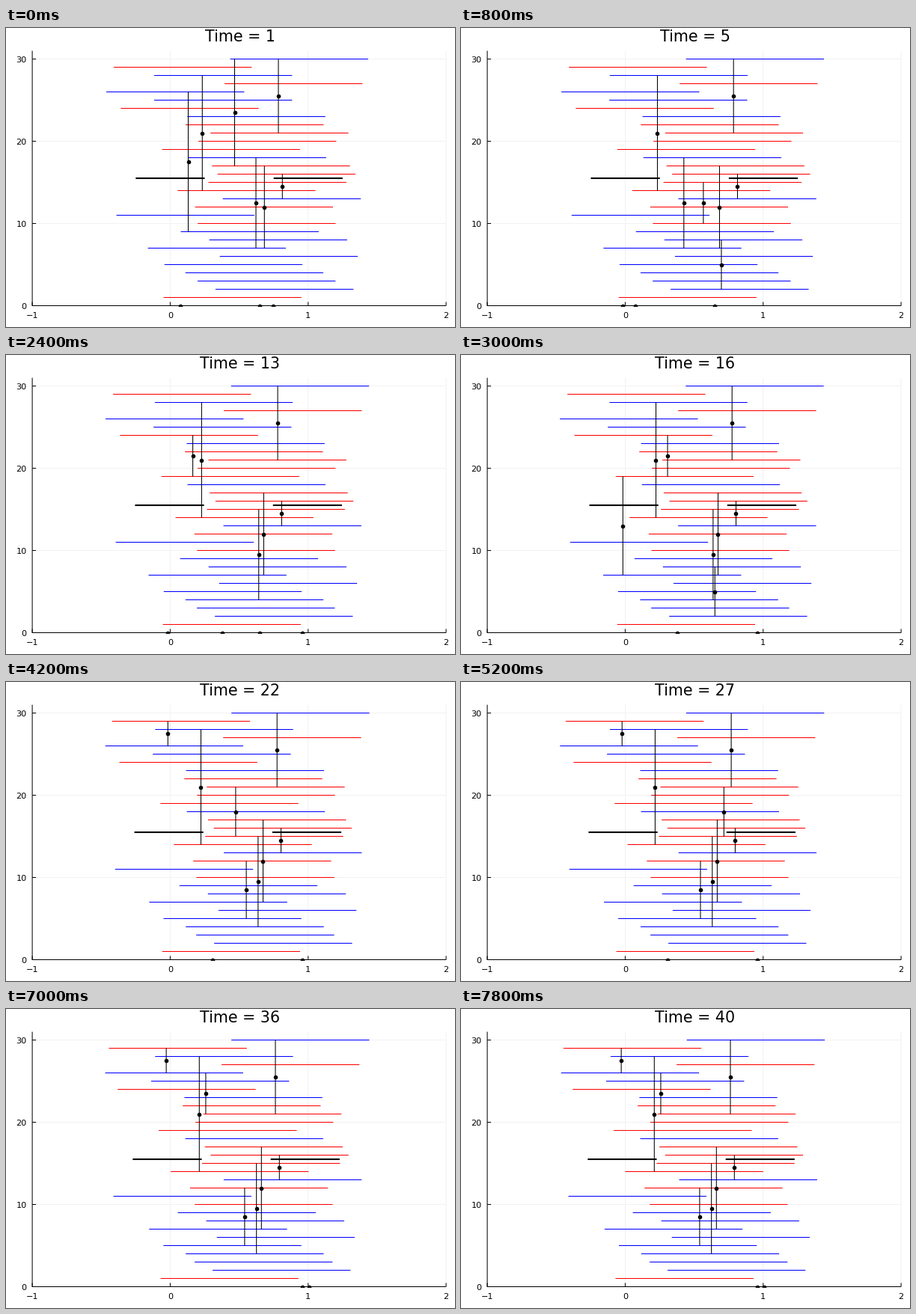
Recreate the animation shown at these times as a matplotlib script. Size 600 px wide and 400 px high, loop 8000 ms.

```python
import numpy as np
import matplotlib.pyplot as plt
from matplotlib.animation import FuncAnimation
from matplotlib.collections import LineCollection
from matplotlib.patches import Rectangle

W, H, DPI = 600, 400, 100
FRAMES, INTERVAL = 40, 200
LEFT, TOP, BASE = 35.1, 30.5, 371.5
UNIT, ROW = 184.33, 11.0      # pixels per x unit and per filament row
RIGHT = LEFT + 3 * UNIT
WALK, SLIDE = 9.1, 0.15       # pixels per step
PX = 72 / DPI                 # one pixel in points

# filaments from the bottom up: direction and left end at the first step
COLORS = [{"R": "red", "B": "blue"}[c]
          for c in "RBBBBBBBBRBRBRRRRBRRRRBRBBRBRB"]
STARTS = [210.5, 280, 256, 239.7, 211.7, 285.7, 189.6, 271.6, 233.6, 256.2,
          147.6, 252.6, 289.7, 229.3, 270.5, 282.6, 275.3, 243.5, 208.6, 257,
          273.2, 240.1, 242.4, 153.3, 198, 134, 292, 198, 144, 299.6]

# motors: first x, then visits (step, lower, upper); (step,) lets go
MOTORS = [
    (262.3, (0, 14, 28)),
    (364.0, (0, 21, 30)),
    (345.3, (0, 7, 17)),
    (369.3, (0, 13, 16)),
    (357.0, (3, 2, 8), (5, 4, 15)),
    (339.3, (15, 2, 8), (17, 5, 12)),
    (305.5, (0, 17, 30), (2, 10, 15), (12,)),
    (243.5, (0, 9, 26), (3,), (15, 7, 19), (18, 26, 29)),
    (334.0, (0, 7, 18), (5,), (19, 15, 21), (31,), (34, 15, 21), (35,)),
    (232.7, (8, 7, 11), (9, 19, 24), (16, 9, 18), (17,), (34, 9, 18),
     (35, 21, 26)),
]


def row_y(n):
    return BASE - ROW * n


def drift(t):
    """Common sideways drift of everything that is bound."""
    return np.interp(t, [0, 9, 14, 21, 31], [0, 0.4, -1.8, -1.8, -4])


def held(visits, t):
    """Filament pair held at step t, or an empty tuple."""
    past = [pair for start, *pair in visits if start <= t]
    return past[-1] if past else ()


def simulate():
    """Motors walk along parallel filaments and slide opposed ones apart."""
    way = np.array([1 if c == "red" else -1 for c in COLORS])
    fil = np.array(STARTS)
    mot = np.array([m[0] for m in MOTORS])
    history = []
    for t in range(FRAMES):
        pairs = [held(visits, t) for _, *visits in MOTORS]
        history.append((fil.copy(), mot.copy(), pairs))
        shift = drift(t + 1) - drift(t)
        fil += shift
        for k, pair in enumerate(pairs):
            if not pair:
                continue
            ends = np.array(pair) - 1
            mot[k] += shift + WALK * way[ends].mean()
            if way[ends].sum() == 0:
                fil[ends] -= SLIDE * way[ends]
    return history


HISTORY = simulate()

plt.rcParams["font.family"] = "DejaVu Sans"
plt.rcParams["path.snap"] = False
fig = plt.figure(figsize=(W / DPI, H / DPI), dpi=DPI, facecolor="white")
ax = fig.add_axes([0, 0, 1, 1])
ax.set_xlim(0, W)
ax.set_ylim(H, 0)
ax.axis("off")


def rule(xs, ys, color="black", z=1):
    ax.plot(xs, ys, color=color, lw=PX, zorder=z, solid_capstyle="butt")


def segments(width, color, z):
    lines = LineCollection([], linewidths=width * PX, colors=color, zorder=z)
    return ax.add_collection(lines)


def label(x, y, text, size, ha="center"):
    return ax.text(x, y, text, fontsize=size * PX, ha=ha, va="baseline",
                   color="black", zorder=6)


for v in range(-1, 3):
    x = LEFT + (v + 1) * UNIT
    rule([x, x], [TOP, BASE], "#f2f2f2", 0)
    rule([x, x], [BASE - 5, BASE])
    label(x, 388, str(v).replace("-", "\u2212"), 11.2)
for v in range(0, 31, 10):
    y = row_y(v)
    rule([LEFT, RIGHT], [y, y], "#f2f2f2", 0)
    rule([LEFT, LEFT + 5], [y, y])
    label(27.5, y + 4, str(v), 11.2, "right")
rule([LEFT, LEFT], [TOP, BASE + 0.5])
rule([LEFT, RIGHT], [BASE, BASE])

title = label(312.5, 18.5, "", 20.7)
filaments = segments(1.05, COLORS, 2)
links = segments(1.05, "black", 3)
bars = segments(2.1, "black", 3)
beads = ax.scatter([], [], s=(5.6 * PX) ** 2, c="black", linewidths=0,
                   zorder=4)
beads.set_clip_path(Rectangle((LEFT, TOP), RIGHT - LEFT, BASE + 0.5 - TOP,
                              transform=ax.transData))


def draw(t):
    fil, mot, pairs = HISTORY[t]
    title.set_text(f"Time = {t + 1}")
    filaments.set_segments([[(x, row_y(n)), (x + UNIT, row_y(n))]
                            for n, x in enumerate(fil, 1)])
    links.set_segments([[(x, row_y(n)) for n in pair]
                        for x, pair in zip(mot, pairs) if pair])
    beads.set_offsets([(x, row_y(sum(pair) / 2))
                       for x, pair in zip(mot, pairs)])
    y = row_y(15.5)
    bar_x = [LEFT + c * UNIT + drift(t) for c in (0.75, 1.75)]
    bars.set_segments([[(x, y), (x + UNIT / 2, y)] for x in bar_x])
    return title, filaments, links, bars, beads


anim = FuncAnimation(fig, draw, frames=FRAMES, interval=INTERVAL,
                     repeat=True, repeat_delay=0, blit=False)
plt.show()
```
